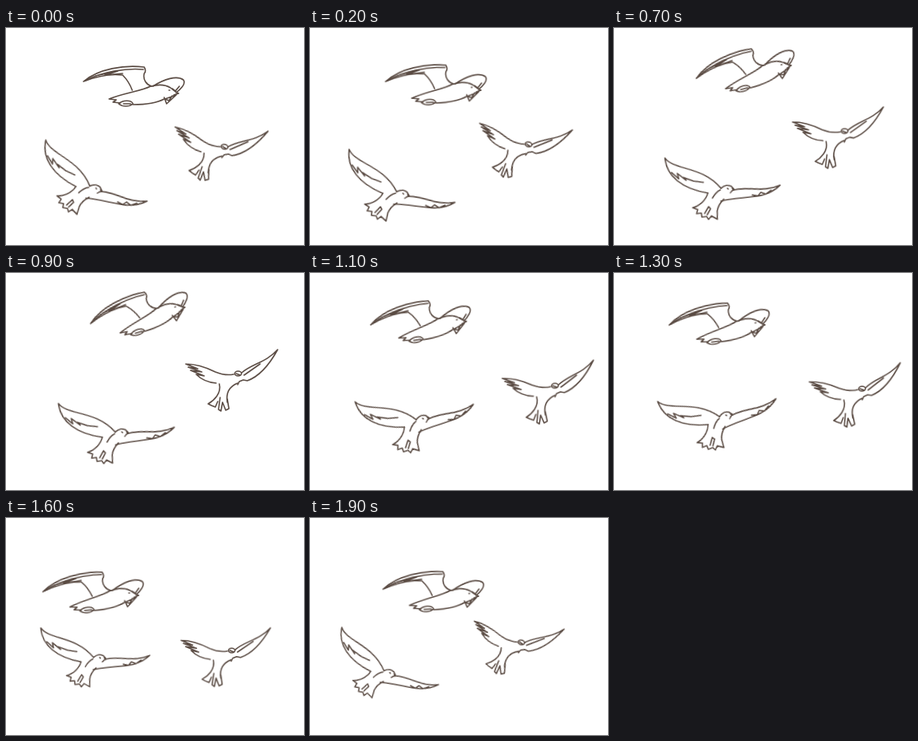
These frames come from a looping animation (373x272 px, 2100 ms). An HTML page without scripts:

```html
<!DOCTYPE html>
<html lang="en">
<head>
<meta charset="utf-8">
<title>Gulls</title>
<style>
html, body { margin: 0; width: 100%; height: 100%; overflow: hidden; background: #fff; }
svg { display: block; width: 100%; height: 100%; }
path, ellipse { fill: none; stroke: #5a4b43; stroke-width: 1.6; stroke-linecap: round; stroke-linejoin: round; }

/* Each pose holds, then one in-between pose leads to the next. */
svg {
  --hold: step-end;
  --late: linear(0 0% 66.666%, .5 66.666% 100%);
  --half: steps(2);
  --lag: linear(0 0% 50%, .2 50% 100%);
}
.bird { animation: 2100ms var(--late) infinite; }
.glider { transform-origin: 216px 82px; animation-name: glide; }
.diver { transform-origin: 138px 210px; animation-name: dive; }
.hoverer { transform-origin: 291px 126px; animation-name: hover; }

@keyframes glide {
  0% { transform: translate(0, 0) rotate(0deg); animation-timing-function: var(--hold); }
  9.5238% { transform: translate(-2px, -4px) rotate(-2deg); }
  23.8095% { transform: translate(-3px, -19px) rotate(-6.5deg); animation-timing-function: var(--half); }
  42.8571% { transform: translate(8px, -39px) rotate(-17deg); animation-timing-function: var(--lag); }
  61.9047% { transform: translate(-27px, -17px) rotate(-7.3deg); }
  76.1904% { transform: translate(-50px, 15px) rotate(-5deg); }
  90.4761%, 100% { transform: translate(-5px, 16px) rotate(-3deg); animation-timing-function: var(--hold); }
}
@keyframes dive {
  0% { transform: translate(-18px, -6px) rotate(11deg); animation-timing-function: var(--hold); }
  9.5238% { transform: translate(-14px, 0) rotate(6.5deg); animation-timing-function: var(--hold); }
  19.0476% { transform: translate(-7px, 5px) rotate(3deg); animation-timing-function: var(--hold); }
  23.8095% { transform: translate(0, 0) rotate(0deg); animation-timing-function: var(--half); }
  42.8571% { transform: translate(15px, -10px) rotate(-8.5deg); animation-timing-function: var(--lag); }
  61.9047% { transform: translate(10px, -33px) rotate(-21.5deg); }
  76.1904% { transform: translate(-13px, -34px) rotate(-6deg) scale(.95); animation-timing-function: var(--hold); }
  85.7142% { transform: translate(-31px, -23px) rotate(2deg) scale(.95); animation-timing-function: var(--hold); }
  90.4761%, 100% { transform: translate(-31px, -13px) rotate(10.5deg) scale(.95); animation-timing-function: var(--hold); }
}
@keyframes hover {
  0% { transform: translate(-17px, 23px) rotate(11.5deg); animation-timing-function: var(--hold); }
  9.5238% { transform: translate(-17px, 20px) rotate(13deg); }
  23.8095% { transform: translate(-10px, 16px) rotate(-3deg) scale(.95); animation-timing-function: var(--half); }
  42.8571% { transform: translate(0, 0) rotate(0deg); animation-timing-function: var(--half); }
  61.9047% { transform: translate(20px, 19px) rotate(-3deg); }
  76.1904% { transform: translate(-8px, 40px) rotate(1deg) scale(.97); }
  90.4761%, 100% { transform: translate(-26px, 30px) rotate(14deg) scale(.97); animation-timing-function: var(--hold); }
}
</style>
</head>
<body>
<svg viewBox="0 0 373 272">
  <g class="bird glider">
    <!-- wings -->
    <path d="M97 67C116 51 148 46 173 49Q176 54 173 57C171 65 176 71 182 73M97 67C112 61 130 57 146 59Q154 67 158 78"/>
    <path d="M99 66C120 55 150 50 172 52M112 60L140 54L124 59L146 57"/>
    <path d="M184 73C198 64 214 59 222 65C226 70 218 77 213 81M208 76L212 79L217 73"/>
    <!-- head and body -->
    <path d="M182 73Q196 69 206 75L211 79L216 82L210 84M204 78h1M198 87L201 95L213 84L199 89L204 91L208 85"/>
    <path d="M181 73C170 79 145 82 129 89L138 90L134 93L143 94M159 96C172 96 187 95 198 89"/>
    <path d="M141 95C146 90 157 90 159 95C154 99 146 99 141 95M147 95h9"/>
  </g>
  <g class="bird diver">
    <!-- wings -->
    <path d="M57 161C66 178 102 176 122 207M57 161C56 184 74 202 105 211M63 180L71 189L70 182L80 192L77 188L89 194L101 197"/>
    <path d="M137 211C156 208 172 219 196 212C174 229 150 219 120 223M160 220L167 222L171 218L177 221L184 217"/>
    <!-- head and tail -->
    <path d="M122 207Q129 202 135 206L138 210L133 214M130 208l1 1M136 209L138 211L135 212M110 218Q115 211 121 209"/>
    <path d="M105 211C102 219 93 226 84 227L90 230L88 235L94 235L94 240L100 240L102 244L106 240L113 245L114 235Q116 227 124 221M98 236L104 228L106 231L101 238"/>
  </g>
  <g class="bird hoverer">
    <!-- wings -->
    <path d="M225 114C240 114 252 119 262 124Q274 129 285 127M225 114L240 120L228 118L245 124L231 122L248 129L238 127Q248 137 263 138"/>
    <path d="M295 125C307 114 326 112 340 96C328 118 316 130 302 135L297 134L292 136L290 140M298 128L318 114"/>
    <!-- head, body and legs -->
    <ellipse cx="290.5" cy="126" rx="4.2" ry="3"/>
    <path d="M288 126l5 2M267 139C270 151 260 160 253 164L257 166L262 168L265 161M290 138C280 142 275 150 277 162"/>
    <path d="M268 156L266 171L269 173L271 162L275 172L279 170L277 158"/>
  </g>
</svg>
</body>
</html>
```
